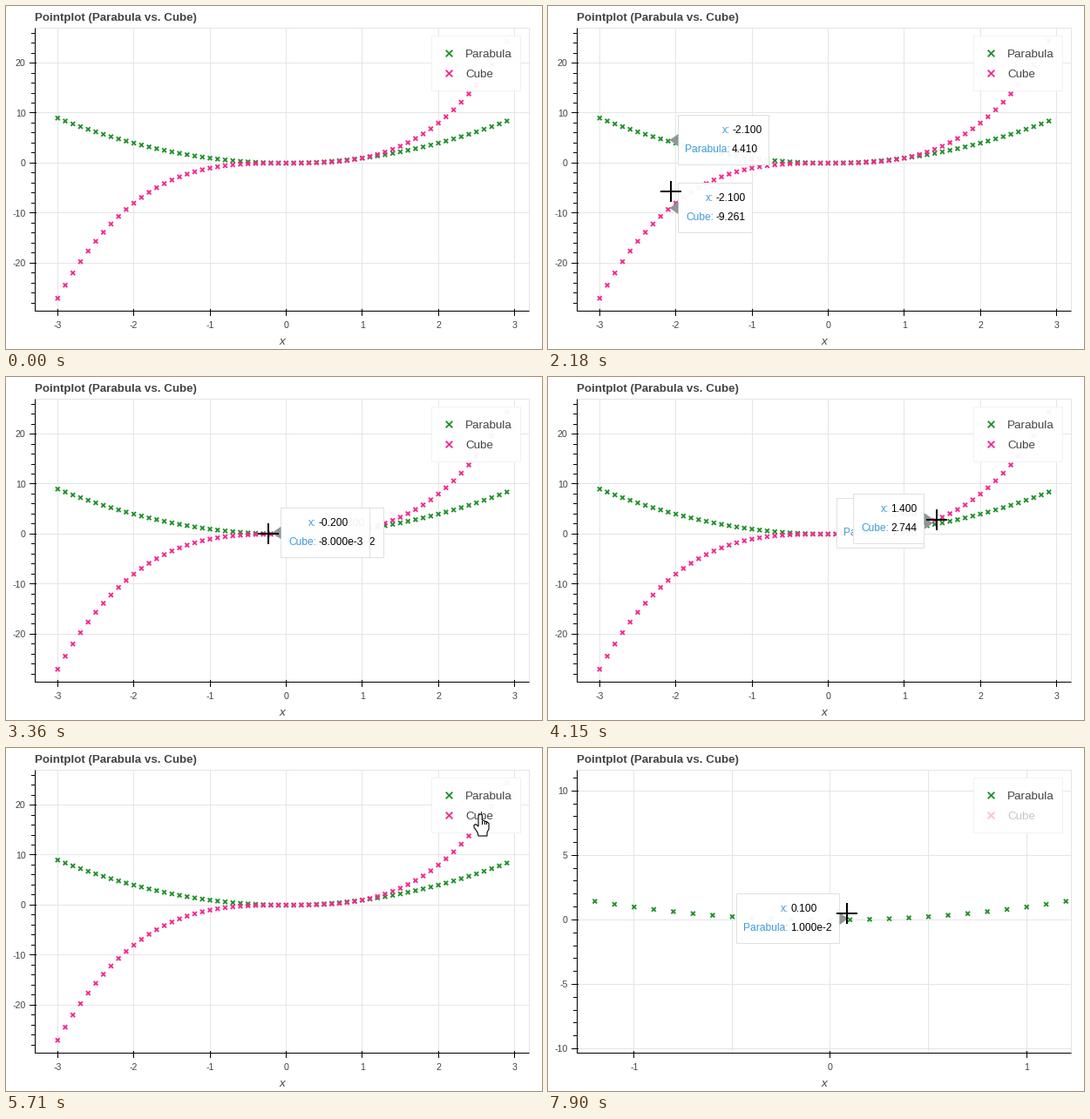
Animation of 615 by 394 pixels, one loop 8 s. Source, as a matplotlib script:

```python
import math

import numpy as np
import matplotlib.pyplot as plt
from matplotlib.animation import FuncAnimation
from matplotlib.patches import Polygon, Rectangle

W, H, DPI = 615, 394, 100
LOOP, INTERVAL = 8000, 40
PX = 72 / DPI                       # points per pixel

LEFT, TOP, PW, PH = 33.5, 25.5, 567, 325
RIGHT, BOTTOM = LEFT + PW, TOP + PH
GREEN, PINK, GRID, INK, BLUE = "#23922b", "#f32a92", "#e5e5e5", "#444444", "#419bd8"

XS = np.arange(-3, 3, 0.1)
CURVES = [("Parabula", XS ** 2, GREEN), ("Cube", XS ** 3, PINK)]

# Full view: data limits padded by 5 percent
VIEW = (-3.295, 3.195, -29.57, 26.958)
FOCUS = (-0.019, 1.87)
ZOOM = 0.388 ** 0.25                # range left after one wheel notch

# The pointer moves in ticks; it rests, clicks the legend, then the wheel turns
TICK_MS, CLICK, WHEEL = 197, 30, 34
PATH = np.array([
    (0, 18, 341), (5, 80.8, 252), (7, 117, 229), (9, 141, 213), (11, 203, 188),
    (15, 301, 180), (17, 382, 178), (22, 541, 142), (24, 562, 117), (27, 544, 76),
    (CLICK, 544, 76), (WHEEL, 310, 159), (38, 343, 190)])
HIT = 3.6                           # reach of the hover, in pixels

ARROW = [(0, 0), (0, 16), (3.7, 12.6), (6.3, 18.6), (8.8, 17.5), (6.3, 11.6), (11.3, 11.4)]
HAND = [(-2, 14), (-2, 1.5), (-0.5, 0), (1, 0), (2.3, 1.5), (2.3, 7), (7.5, 8.7), (10, 10.5),
        (10, 17), (8, 21), (8, 25), (-2, 25), (-3, 21), (-7, 15), (-7, 12.5), (-5, 11.5)]

plt.rcParams.update({"font.family": "Liberation Sans", "path.snap": False})
fig = plt.figure(figsize=(W / DPI, H / DPI), dpi=DPI, facecolor="white")
ax = fig.add_axes([0, 0, 1, 1])


def crisp(v):
    """Centre of the pixel that holds v."""
    return math.floor(v + 1e-6) + 0.5


def text(x, y, s, size, color=INK, ha="left", z=3, **kw):
    ax.text(x, y, s, fontsize=size * PX, color=color, ha=ha, va="baseline", zorder=z, **kw)


def hline(x0, x1, y, color, z=1):
    ax.plot([x0, x1], [crisp(y)] * 2, color=color, lw=PX, zorder=z, solid_capstyle="butt")


def vline(x, y0, y1, color, z=1):
    ax.plot([crisp(x)] * 2, [y0, y1], color=color, lw=PX, zorder=z, solid_capstyle="butt")


def rect(x, y, w, h, z, fill="none", edge="none", alpha=1):
    ax.add_patch(Rectangle((x, y), w, h, fc=fill, ec=edge, lw=PX, alpha=alpha, zorder=z))


def panel(x, y, w, h, edge, z):
    rect(x, y, w, h, z, fill="white", alpha=0.95)
    rect(x, y, w, h, z, edge=edge)


def crosses(x, y, color, r, z):
    """All markers as one path, strokes parted by gaps."""
    x, y = np.atleast_1d(x)[:, None], np.atleast_1d(y)[:, None]
    dx = np.array([-r, r, np.nan, -r, r, np.nan])
    dy = np.array([-r, r, np.nan, r, -r, np.nan])
    return ax.plot((x + dx).ravel(), (y + dy).ravel(), color=color, lw=1.9 * PX,
                   zorder=z, solid_capstyle="butt")[0]


def nice_step(span):
    steps = [m * 10.0 ** e for e in (-1, 0, 1) for m in (1, 2, 5)]
    return min(steps, key=lambda s: abs(span / s - 6))


def multiples(step, lo, hi):
    return step * np.arange(math.ceil(lo / step), math.floor(hi / step) + 1)


def fmt(v):
    if abs(v) < 1e-9:
        return "0.000"
    if abs(v) < 0.1:
        mantissa, power = f"{v:.3e}".split("e")
        return f"{mantissa}e{int(power)}"
    return f"{v:.3f}"


def text_width(s):
    narrow = {".": 0.278, ":": 0.278, "-": 0.333, "r": 0.333, "l": 0.222, "P": 0.65, "C": 0.722}
    return 12 * sum(narrow.get(c, 0.556) for c in s)


def draw_axes(view, px, py):
    x0, x1, y0, y1 = view
    rect(LEFT, TOP, PW, PH, 1, edge=GRID)
    xstep, ystep = nice_step(x1 - x0), nice_step(y1 - y0)
    for v in multiples(xstep, x0, x1):
        vline(px(v), TOP, BOTTOM, GRID)
        if abs(v - round(v)) < 1e-6:
            vline(px(v), BOTTOM - 2.5, BOTTOM + 5.5, "black", 3)
            text(px(v), 370, f"{round(v)}", 10.67, ha="center")
    for v in multiples(ystep, y0, y1):
        hline(LEFT, RIGHT, py(v), GRID)
        hline(LEFT - 6.5, LEFT + 1.5, py(v), "black", 3)
        text(22.7, py(v) + 3.8, f"{round(v)}", 10.67, ha="right")
    for v in multiples(ystep / 5, y0, y1):
        hline(LEFT - 4.5, LEFT, py(v), "black", 3)
    vline(LEFT, TOP, BOTTOM + 0.5, "black", 3)
    hline(LEFT, RIGHT, BOTTOM, "black", 3)
    text(33, 17, "Pointplot (Parabula vs. Cube)", 13.33, weight="bold")
    text(317.3, 389, "x", 13.33, ha="center", style="italic")


def draw_legend(cube_on):
    panel(488.5, 34.5, 102, 63, "#f2f2f2", 4)
    for i, (name, _, color) in enumerate(CURVES):
        muted = name == "Cube" and not cube_on
        crosses(508.5, 54.5 + 23 * i, "#fcbfdc" if muted else color, 3.8, 5)
        text(527, 59 + 23 * i, name, 13.33, "#c6c6c6" if muted else INK, z=5)


def draw_tip(x, y, rows, z):
    label_w = max(text_width(k + ":") for k, _ in rows)
    wide = round(19 + label_w + max(text_width(v) for _, v in rows))
    side = 1 if x < LEFT + PW / 2 else -1
    edge, top = crisp(x + 12 * side), crisp(y - 30)
    left = edge if side > 0 else edge - wide
    panel(left, top, wide, 57, "#e0e0e0", z)
    mid = top + 28.5
    ax.add_patch(Polygon([(edge - 10 * side, mid), (edge, mid - 7), (edge, mid + 7)],
                         fc="#909599", ec="none", zorder=z))
    split = left + 8.5 + label_w
    for i, (label, value) in enumerate(rows):
        base = top + 20.5 + 22 * i
        text(split, base, label + ":", 12, BLUE, "right", z)
        text(split + 2, base, value, 12, "black", z=z)


def draw_pointer(x, y, kind):
    if kind == "cross":
        x, y = round(x), round(y)
        rect(x - 1, y - 12, 2, 24, 20, fill="black")
        rect(x - 12, y - 1, 24, 2, 20, fill="black")
        return
    shape = np.array(ARROW if kind == "arrow" else HAND) + (x, y)
    ax.add_patch(Polygon(shape, fc="white", ec="black", lw=1.1 * PX, zorder=20))
    if kind == "hand":
        for dx in (2.3, 5, 7.5):
            vline(x + dx, y + 8, y + 12, "black", 21)


def pointer_kind(x, y):
    if x < LEFT:
        return "arrow"
    return "hand" if 488 < x < 591 and 34 < y < 98 else "cross"


def paint(tick):
    ax.clear()
    ax.set(xlim=(0, W), ylim=(H, 0))
    ax.axis("off")

    s = ZOOM ** max(0, tick - WHEEL)
    view = [FOCUS[i // 2] + (v - FOCUS[i // 2]) * s for i, v in enumerate(VIEW)]
    x0, x1, y0, y1 = view

    def px(v):
        return LEFT + (v - x0) / (x1 - x0) * PW

    def py(v):
        return TOP + (y1 - v) / (y1 - y0) * PH

    cube_on = tick < CLICK
    curves = CURVES if cube_on else CURVES[:1]
    draw_axes(view, px, py)
    clip = Rectangle((LEFT, TOP), PW, PH, transform=ax.transData)
    for _, ys, color in curves:
        crosses(px(XS), py(ys), color, 2.4, 2).set_clip_path(clip)
    draw_legend(cube_on)

    if tick < 0:
        return
    x, y = (np.interp(tick, PATH[:, 0], PATH[:, c]) for c in (1, 2))
    kind = pointer_kind(x, y)
    gaps = abs(px(XS) - x)
    i = int(gaps.argmin())
    if kind == "cross" and gaps[i] < HIT:
        for z, (name, ys, _) in enumerate(curves, 10):
            draw_tip(px(XS[i]), py(ys[i]), [("x", fmt(XS[i])), (name, fmt(ys[i]))], z)
    draw_pointer(x, y, kind)


painted = None


def update(i):
    global painted
    tick = (i * INTERVAL + 30 - 380) // TICK_MS
    if tick != painted and (tick >= 0 or painted is None or painted >= 0):
        paint(tick)
        painted = tick
    return []


anim = FuncAnimation(fig, update, frames=LOOP // INTERVAL, interval=INTERVAL,
                     repeat=True, repeat_delay=0, blit=False)
plt.show()
```
